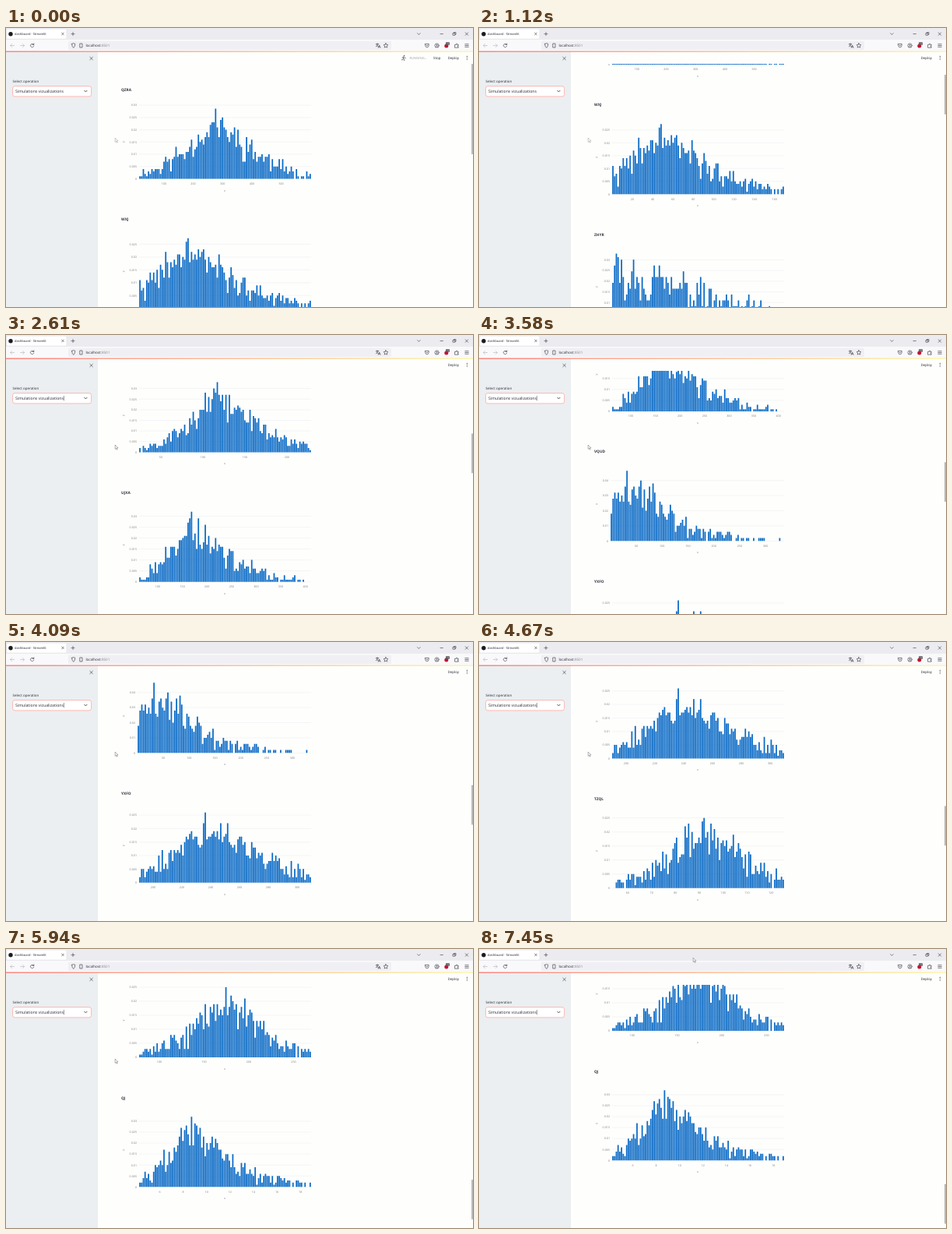
These frames come from a looping animation (600x358 px, 7.67 s). An HTML page:

```html
<!DOCTYPE html>
<html lang="en">
<head>
<meta charset="utf-8">
<title>Dashboard</title>
<style>
  html, body { margin: 0; height: 100%; overflow: hidden; background: #fefefc; }
  svg { display: block; width: 600px; height: 358px; }
  text { font-family: "Noto Sans", "Open Sans", sans-serif; text-rendering: geometricPrecision; fill: #31333f; }
  .tick { font-size: 3.7px; fill: #85868c; }
  .title { font-size: 4.8px; font-weight: 700; }
  .bars { fill: #0a6ac6; }
  .grid { stroke: #e6ebef; stroke-width: .5; }
  .icon { fill: none; stroke: #4a4a52; stroke-width: .7; stroke-linecap: round; stroke-linejoin: round; }
  .faint { stroke: #bcbcc2; }
</style>
</head>
<body>
<svg viewBox="0 0 600 358">
  <defs>
    <linearGradient id="glow"><stop stop-color="#ff6d66"/><stop offset="1" stop-color="#fdf59a"/></linearGradient>
  </defs>
  <rect width="600" height="358" fill="#fefefc"/>
  <g id="page"></g>

  <!-- app header -->
  <rect x="118" y="30" width="482" height="16" fill="#fefefc"/>
  <g id="running">
    <circle cx="511.6" cy="35.6" r=".8" fill="#555"/>
    <path class="icon" d="M511 37l-.6 2.2 1.6 1 -.4 1.6M510.4 39.4l-.6 1.4h-1.4M509 38l2-.9 1.2 1.3h1.2"/>
    <text x="518.5" y="40" font-size="4.1" style="fill:#a5a6ac">RUNNING...</text>
    <text x="549" y="40" font-size="4.4">Stop</text>
  </g>
  <text x="567.7" y="40" font-size="4.4">Deploy</text>
  <path d="M592.3 36.4v.01m0 1.9v.01m0 1.9v.01" stroke="#31333f" stroke-width="1.1" stroke-linecap="round"/>
  <rect id="thumb" x="598.4" width="1.2" rx=".6" fill="#8b8b90"/>

  <!-- sidebar -->
  <rect y="30" width="118" height="328" fill="#ebeff1"/>
  <path class="icon" d="M107.8 37.2l3.6 3.6m0-3.6l-3.6 3.6"/>
  <text x="8.5" y="70.4" font-size="4.45">Select operation</text>
  <rect x="8.6" y="74.7" width="101" height="13.2" rx="2.6" fill="#fff" stroke="#ff9c98" stroke-width=".7"/>
  <text x="12" y="83" font-size="5.15">Simulations vizualizations</text>
  <path id="caret" d="M74.4 78v6.4" stroke="#31333f" stroke-width=".5"/>
  <path class="icon" d="M100.8 80.3l1.6 1.6 1.6-1.6" style="stroke-width:1"/>

  <!-- browser -->
  <rect width="600" height="15" fill="#ececf0"/>
  <rect x=".8" y="1.3" width="77" height="12.8" rx="1.6" fill="#fff" stroke="#dcdce2" stroke-width=".4"/>
  <circle cx="6" cy="7.7" r="2.7" fill="#1c1c20"/>
  <text x="11" y="9.2" font-size="4.05">dashboard · Streamlit</text>
  <path class="icon" d="M71.6 6.2l2.6 2.6m0-2.6l-2.6 2.6M84 7.6h4m-2-2v4M528.6 6.7l1.8 1.8 1.8-1.8M558 7.6h3.4M574.4 6.6h2.6v2.6h-2.6zM575.4 6.6v-1h2.6v2.6h-1M590.2 5.9l3.4 3.4m0-3.4l-3.4 3.4"/>
  <rect y="15" width="600" height="15" fill="#f9f9fb"/>
  <rect x="80" y="16.8" width="415" height="11.4" rx="1.6" fill="#f0f0f4"/>
  <path class="icon faint" d="M10.6 22.5h-5m2-2l-2 2 2 2M18.6 22.5h5m-2-2l2 2-2 2"/>
  <path class="icon" d="M35.6 21.3a2.2 2.2 0 1 0 .2 1.9M35.8 19.9v1.6h-1.7M84.6 20.4l2.1-.8 2.1.8q0 3.6-2.1 5-2.1-1.4-2.1-5zM95.2 20h2.8v5h-2.8zM475.4 20.6h3.4M477 19.8v.8M478.2 20.6q-.7 2.4-2.8 3.2M476 21.7q.7 1.4 2 2M478.2 25.4l1.4-3.4 1.4 3.4M478.8 24.2h1.8M488 19.6l.9 1.8 2 .3-1.5 1.4.4 2-1.8-1-1.8 1 .4-2-1.5-1.4 2-.3zM538.6 20.4h4.6v1.8q-.3 2.7-2.3 2.7t-2.3-2.7zM539.8 21.9l1.1 1.1 1.1-1.1M577 21.4h1.4v-1h1.4v1h1.4v1.4h-.9v1.2h.9v1.2H577zM589.8 20.7h4.4m-4.4 1.8h4.4m-4.4 1.8h4.4"/>
  <circle class="icon" cx="553.6" cy="22.5" r="2.6"/>
  <circle cx="553.6" cy="21.8" r=".9" fill="#4a4a52"/>
  <path class="icon" d="M552 24.3q1.6-1.5 3.2 0"/>
  <circle cx="565.8" cy="23" r="2.5" fill="#c8102e"/>
  <rect x="565" y="18.2" width="5" height="3.6" rx=".6" fill="#55555c"/>
  <text x="566" y="21.2" font-size="3" style="fill:#fff">12</text>
  <text x="102.4" y="24.3" font-size="4.57">localhost<tspan fill="#8a8a92">:8501</tspan></text>
  <rect y="29.6" width="600" height="1.2" fill="url(#glow)"/>

  <path id="cursor" d="M0 0v5.3l1.2-1.1.9 2 .9-.4-.9-1.9h1.7z" fill="#fff" stroke-width=".45"/>
</svg>
<script>
const $ = id => document.getElementById(id);
const LOOP = 7670, GAP = 166.3, RIGHT = 392, BINS = 100, TALLEST = 90;
const page = $('page');
let seed = 11, count = 0;

function rand() {
  seed = (seed * 1664525 + 1013904223) % 4294967296;
  return seed / 4294967296;
}

const label = (x, y, s, anchor, cls = 'tick') =>
  `<text class="${cls}" x="${x}" y="${y}" text-anchor="${anchor}">${s}</text>`;

// Histogram of noisy samples around a lopsided bell; the bin at the mode is the tallest.
function chart(name, max, [lo, hi, step], [mode, rise, fall], samples = 1000) {
  const coarse = max > .04, left = coarse ? 169 : 171, tickY = coarse ? .01 : .005;
  const width = RIGHT - left, pitch = width / BINS, most = max * samples;
  let out = label(148, -112.8, name, 'start', 'title'), bars = '';

  for (let v = 0; v < max * 1.051; v += tickY) {
    const y = -v / max * TALLEST;
    out += `<path class="grid" d="M${left} ${y}H${RIGHT}"/>` + label(left - 3, y + 1.3, +v.toFixed(3), 'end');
  }
  for (let i = 0; i < BINS; i++) {
    const d = i / BINS - mode;
    const mean = most * .74 * Math.exp(-((Math.abs(d) / (d < 0 ? rise : fall)) ** 1.5));
    const noisy = Math.round(mean + (rand() + rand() - 1) * 2 * Math.sqrt(mean));
    const n = i === Math.round(mode * BINS) ? most : Math.max(0, Math.min(noisy, most * .95));
    if (n) bars += `M${left + i * pitch + .2} 0v${-n / most * TALLEST}h1.75V0z`;
  }
  out += `<path class="bars" d="${bars}"/>`;
  for (let v = Math.ceil(lo / step) * step; v < hi - width * .015 * (hi - lo) / width; v += step)
    out += label(left + (v - lo) / (hi - lo) * width, 7.4, v, 'middle');
  out += label(281, 16, 'x', 'middle') + `<text class="tick" transform="translate(152 -47.5) rotate(-90)" text-anchor="middle">y</text>`;
  page.innerHTML += `<g transform="translate(0 ${193.5 + GAP * count++})">${out}</g>`;
}

// name, highest density, [x from, x to, tick], [mode, rise, fall]
chart('QZRA', .0286, [15.5, 602, 100], [.44, .25, .29]);
chart('WXJ', .0273, [.1, 169.4, 20], [.28, .28, .36]);
chart('ZHYR', .0329, [.04, 15.5, 2], [.02, .2, .62], 365);
chart('OQVN', .033, [24.1, 228.7, 50], [.45, .22, .31]);
chart('UJXA', .032, [62, 411.7, 50], [.3, .17, .27]);
chart('VQUD', .0464, [.3, 336, 50], [.09, .2, .32], 500);
chart('YXFO', .026, [190.3, 309.7, 20], [.38, .26, .4]);
chart('TZQL', .025, [53.5, 125.5, 10], [.53, .29, .31]);
chart('KXWU', .027, [30, 145, 20], [.42, .25, .3]);
chart('VJQE', .025, [77.4, 269.6, 50], [.5, .27, .26]);
chart('QJ', .032, [4.24, 18.92, 2], [.3, .2, .3]);

// scroll offset through [time, offset] stops, monotone cubic
const stops = [[0, 0], [1880, 319.6], [2610, 541.7], [3580, 760.5], [4670, 1041.6], [5940, 1551], [6270, 1585.2]];
const rate = i => i < 0 || i > stops.length - 2 ? 0 : (stops[i + 1][1] - stops[i][1]) / (stops[i + 1][0] - stops[i][0]);
const slope = i => { const a = rate(i - 1), b = rate(i); return a * b ? 2 * a * b / (a + b) : 0; };

function scrollAt(t) {
  const i = stops.findIndex(s => s[0] > t) - 1;
  if (i < 0) return stops[stops.length - 1][1];
  const [t0, a] = stops[i], [t1, b] = stops[i + 1], d = t1 - t0, u = (t - t0) / d, w = 1 - u;
  return a * w * w * (1 + 2 * u) + b * u * u * (3 - 2 * u) + d * u * w * (slope(i) * w - slope(i + 1) * u);
}

function ease(t, from, to) {
  const u = Math.max(0, Math.min(1, (t - from) / (to - from)));
  return u * u * (3 - 2 * u);
}

const show = (id, on) => $(id).setAttribute('visibility', on ? 'visible' : 'hidden');

function draw(now) {
  const t = now % LOOP, y = scrollAt(t), loading = t < 450;
  page.setAttribute('transform', `translate(0 ${-y})`);
  $('thumb').setAttribute('y', loading ? 46 : 35.3 + y * .168);
  $('thumb').setAttribute('height', loading ? 116 : 51);
  show('running', loading);
  show('caret', t > 2430 || (t + 570) % 1000 < 500);
  const move = ease(t, 6360, 7090);
  $('cursor').setAttribute('stroke', t < 2400 ? '#8b8d92' : '#55565c');
  $('cursor').setAttribute('transform', `translate(${140.2 + 128 * move + 7 * ease(t, 7180, 7450)} ${141 - 129.7 * move})`);
  requestAnimationFrame(draw);
}
requestAnimationFrame(draw);
</script>
</body>
</html>
```
